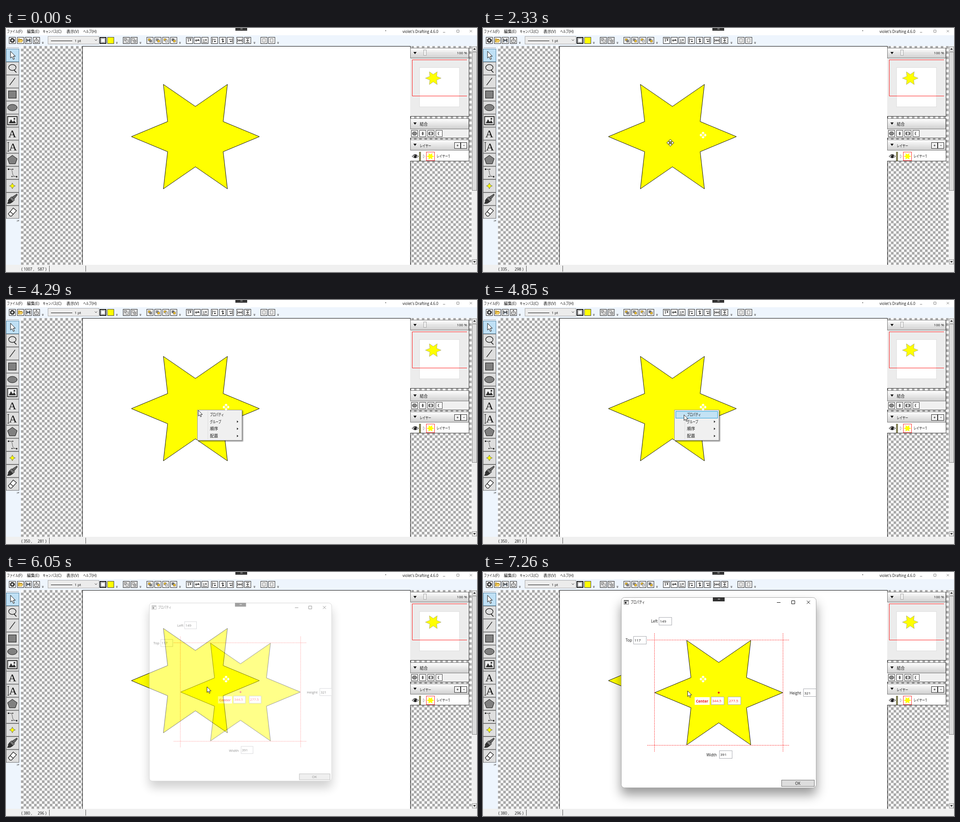
Animation, 1037 px wide and 540 px high, one loop 8 s. Source, as an HTML page:

```html
<!DOCTYPE html>
<html lang="ja">
<head>
<meta charset="utf-8">
<title>Star properties</title>
<style>
  html, body { margin: 0; width: 100%; height: 100%; overflow: hidden; background: #fff; }
  svg { display: block; width: 1037px; height: 540px; }
  text { font-family: 'Open Sans', 'Noto Sans CJK JP', 'Noto Sans CJK', sans-serif; fill: #111; white-space: pre; }
  .cjk { font-family: 'Noto Sans CJK JP', 'Noto Sans CJK', sans-serif; }
  .serif { font-family: 'Liberation Serif', serif; }
  .shade { filter: drop-shadow(0 15px 12px rgba(0,0,0,.4)); }
  .lift { filter: drop-shadow(2px 2px 1px rgba(0,0,0,.45)); }
</style>
</head>
<body>
<svg id="stage" viewBox="0 0 1037 540" xmlns="http://www.w3.org/2000/svg"></svg>
<script>
const stage = document.getElementById('stage');
const ZOOM = 0.721; // stage pixels per canvas unit
const KANA = 0.7;   // kana of the interface face are narrower than kanji

// ---------- drawing helpers ----------
const rect = (x, y, w, h, fill, stroke = 'none', more = '') =>
  `<rect x="${x}" y="${y}" width="${w}" height="${h}" fill="${fill}" stroke="${stroke}" ${more}/>`;
const path = (d, fill = 'none', stroke = '#111', more = '') =>
  `<path d="${d}" fill="${fill}" stroke="${stroke}" ${more}/>`;
const oval = (x, y, rx, ry, fill, stroke = 'none', more = '') =>
  `<ellipse cx="${x}" cy="${y}" rx="${rx}" ry="${ry}" fill="${fill}" stroke="${stroke}" ${more}/>`;
const group = (x, y, body, more = '') => `<g transform="translate(${x} ${y})" ${more}>${body}</g>`;
const latin = (x, y, s, size = 8.3, more = '') =>
  `<text x="${x}" y="${y}" font-size="${size}" ${more}>${s}</text>`;

function label(x, y, s, size = 8.8) {
  return s.match(/[ァ-ヿ]+|[一-鿿]+|[^ァ-ヿ一-鿿]+/g).map(run => {
    const kana = /[ァ-ヿ]/.test(run), kanji = /[一-鿿]/.test(run);
    if (!kana && !kanji) return latin(x, y, run, size * 0.95);
    const squeeze = kana ? KANA : 1;
    const out = `<text class="cjk" font-size="${size}" transform="translate(${x} ${y}) scale(${squeeze} 1)">${run}</text>`;
    x += run.length * size * squeeze;
    return out;
  }).join('');
}

function star(cx, cy, R, stroke = '#111', width = 1, tips = 6, inner = 0.5, squash = 0.947) {
  const pts = Array.from({ length: tips * 2 }, (_, i) => {
    const a = Math.PI * i / tips, r = i % 2 ? R * inner : R;
    return (cx + r * Math.cos(a)).toFixed(1) + ',' + (cy + r * squash * Math.sin(a)).toFixed(1);
  });
  return `<polygon points="${pts.join(' ')}" fill="#ff0" stroke="${stroke}" stroke-width="${width}"/>`;
}

const ARROW = 'M0 0V12.6L2.9 9.9 4.9 14.4 6.9 13.5 5 9.2H9Z';

// four diamonds around a centre, the move pointer
const cross = (stroke, core) =>
  [0, 90, 180, 270].map(a => path('M0-7.8 3.4-4.4 0-1.8-3.4-4.4Z', '#fff', stroke, `transform="rotate(${a})"`)).join('') +
  oval(0, 0, core, core, '#fff', stroke);

// ---------- window frame, menu bar and tool bar ----------
function topBars() {
  let s = rect(0, 0, 1037, 40, '#fff') + rect(0, 16, 1037, 24, '#eef5fd');
  [[2, 'ファイル(F)'], [46, '編集(E)'], [81, 'キャンバス(C)'], [133, '表示(V)'], [170, 'ヘルプ(H)']]
    .forEach(([x, t]) => s += label(x, 11, t));
  s += rect(505, 0, 26, 6, '#333') + rect(516, 1, 5, 2, '#888') + oval(836, 6, 1, 1, '#555');
  s += latin(952, 11, "violet's Drafting 4.6.0", 8.1, 'text-anchor="end"');
  s += path('M962 9.5H967M992.5 4.5H997.5V9.5H992.5ZM1021 4.5 1026 9.5M1026 4.5 1021 9.5', 'none', '#888');

  const box = (cx, icon) => rect(cx - 7, 20.5, 14, 14, '#fff', '#222') + group(cx, 27.5, icon);
  const more = x => path(`M${x - 2} 31.5H${x + 2}`, 'none', '#666') + path(`M${x - 2} 33H${x + 2}L${x} 35Z`, '#444', 'none');

  s += box(14, oval(0, 0, 3.4, 3.4, 'none', '#111', 'stroke-width="2"') +
    oval(0, 0, 4.8, 4.8, 'none', '#111', 'stroke-width="1.6" stroke-dasharray="1.9 1.87"'));
  s += box(32, path('M-5 4V-4H-2L-1-3H3V-1', '#e8b93c', '#8a6a10', 'stroke-width=".7"') +
    path('M-5 4-2.5-1H5.5L3 4Z', '#ffd766', '#8a6a10', 'stroke-width=".7"'));
  s += box(49, path('M-4.5-4.5H3.5L4.5-3.5V4.5H-4.5Z', '#33383e', 'none') + rect(-2.5, -4.5, 5, 3, '#fff') + rect(-2.8, 0.5, 5.6, 4, '#cdd6df'));
  s += box(67, path('M-2-1H-4V4.5H4V-1H2M0 2V-5M-2.2-3 0-5.2 2.2-3'));
  s += more(81);

  s += rect(92.5, 18.5, 112, 17, '#ececec', '#aaa') + path('M99 28.5H146') + latin(151, 31, '1 pt', 8);
  s += path('M195.5 25.5 198 28 200.5 25.5', 'none', '#444');
  s += rect(207, 21, 13, 13, '#fff', '#111', 'stroke-width="2"') + rect(209.5, 23.5, 8, 8, '#fff', '#888');
  s += rect(223.5, 20.5, 14, 14, '#ff0', '#444') + more(244);

  const pair = (a, b) => rect(-4, -4, 5, 5, a, '#555', 'stroke-width=".7"') + rect(-1, -1, 5, 5, b, '#555', 'stroke-width=".7"');
  const frame = rect(-5, -5, 10, 10, 'none', '#777', 'stroke-dasharray="1.5 1.5"');
  s += box(265, frame + pair('#ccc', '#eee')) + box(282, frame + pair('#eee', '#bbb')) + more(296);
  const gold = '#f2c230';
  [[gold, '#888'], ['#999', gold], [gold, '#ddd'], ['#777', gold]].forEach((c, i) => s += box(317 + 17.4 * i, pair(...c)));
  s += more(383);

  const bars = vertical => `<g ${vertical ? 'transform="rotate(90)"' : ''}>` + rect(-3.5, -3, 2.4, 6, '#888') + rect(1, -3, 2.4, 4, '#444');
  [[404, 0, -4.5], [421, 0, 0], [438, 0, 4.5], [459, 1, 4.5], [477, 1, 0], [494, 1, -4.5]]
    .forEach(([x, v, line]) => s += box(x, bars(v) + path(`M-5 ${line}H5`) + '</g>'));
  s += box(515, path('M-4.5-4V4M4.5-4V4M0-3V3M-4 0H4')) + box(532, path('M-4-4.5H4M-4 4.5H4M-3 0H3M0-4V4')) + more(547);
  const fit = rect(-3, -4, 6, 8, '#eee', '#777');
  return s + box(568, fit) + box(585, fit) + more(599);
}

// ---------- tool box on the left ----------
function toolBox() {
  let s = rect(0, 40, 33, 484, '#eef5fd') + path('M2 43.5H28', 'none', '#666', 'stroke-dasharray="1.5 1.5"');
  const big = (x, t) => `<text class="serif" x="${x}" y="8" font-size="24" text-anchor="middle">${t}</text>`;
  const icons = [
    path('M-4-9V6L-.6 3 2 9 4.5 8 2 2H6.5Z', '#fff'),
    oval(0, -2, 8, 6.5, 'none', '#111', 'stroke-width="1.2"') + path('M4 3Q5 6 9 9', 'none', '#111', 'stroke-width="1.5"'),
    path('M-6 8 6-8', 'none', '#111', 'stroke-width="1.2"'),
    rect(-8.5, -8, 17, 16, '#808080', '#111'),
    oval(0, 0, 10.5, 7, '#808080', '#111'),
    rect(-10.5, -9, 21, 18, '#eee', '#333', 'stroke-width="2"') + path('M-8 6-3-3 1 3 4-1 8 6Z', '#333', 'none') + oval(4.5, -4, 2, 2, '#333'),
    big(0, 'A'),
    big(1.5, 'A') + path('M-9-9V10M-11-9.5H-7M-11 10H-7'),
    path('M0-10 10.5-2.5 6.5 9H-6.5L-10.5-2.5Z', '#808080'),
    path('M-8-8C6-10-6 9 9 8M-8-8H1M9 8H-1', 'none', '#555') + rect(-10, -9.5, 3, 3, '#222') + rect(8, 7, 3, 3, '#222') + oval(1, -8, 1.2, 1.2, '#222') + oval(-1, 8, 1.2, 1.2, '#222'),
    star(0, 0, 6.5, '#555', 0.8, 4, 0.45, 1),
    path('M10-11 11-9 4 0-1-4Z', '#666', '#222') + path('M-2-5 5 2 1 6-6-1Z', '#777', '#222') + path('M-6-1 1 6Q-4 11-11 10-8 6-9 3Z', '#333', '#222'),
    path('M-9 4 2-9 9-3-2 9H-5ZM-5-1 2 5', '#fff', '#111', 'stroke-width="1.2"')
  ];
  icons.forEach((icon, i) => {
    const y = 60.5 + 28.9 * i;
    s += rect(0.5, y - 14, 28, 28, i ? '#dedede' : '#bfe0f5', i ? '#707070' : '#5a8aa8') + group(14, y, icon);
  });
  return s + path('M24 425 25.5 427 24 429M26.5 425.5H28.5L27.5 428Z', 'none', '#555', 'stroke-width=".8"');
}

// ---------- panels on the right ----------
function panels() {
  const head = (y, h) => rect(890.5, y, 128.5, h, 'url(#head)', '#777') + path(`M897 ${y + 8.5}H904L900.5 ${y + 13.5}Z`, '#111', 'none');
  let s = rect(890, 44, 129, 152, '#ececec') + head(44.5, 22);
  s += path('M908 55H985', 'none', '#ddd') + rect(919.5, 48.5, 6, 12, '#f0f0f0', '#aaa') + latin(1015, 58, '100 %', 8, 'text-anchor="end"');
  s += rect(910.5, 87.5, 88, 87, '#fff', '#ddd') + star(940.7, 111, 17.3, '#777', 0.5);
  s += path('M1015 70.5H894.5V150.5H1015', 'none', '#f22');
  s += path('M890 195.5H1019.5V44', 'none', '#333');

  s += rect(890, 200, 129, 44, '#f0f0f0') + head(200.5, 23) + label(911, 216, '結合');
  const cells = [oval(0, 0, 5, 4, '#888', '#444'), oval(0, 0, 2, 4, '#666'),
    path('M-1-4A4 4 0 0 0-1 4Q-3 0-1-4ZM1-4A4 4 0 0 1 1 4Q3 0 1-4Z', '#777', '#444', 'stroke-width=".7"'),
    path('M1-4A4 4 0 1 0 1 4Q-3 0 1-4Z', '#666', 'none')];
  cells.forEach((c, i) => s += rect(892.5 + 18 * i, 226.5, 14, 14, '#fff', '#444') + group(899.5 + 18 * i, 233.5, c));
  s += path('M890 243.5H1019.5V200', 'none', '#333');

  s += rect(890, 247, 129, 48, '#fff') + head(247.5, 23) + label(911, 264, 'レイヤー', 9);
  s += rect(987.5, 253.5, 13, 13, '#f4f4f4', '#333') + rect(1001.5, 253.5, 13, 13, '#f4f4f4', '#333');
  s += path('M992 260H996.5M994.2 257.8V262.2M1006.5 260H1010', 'none', '#222', 'stroke-width=".9"');
  s += path('M894 284Q901 276 908 284 901 291 894 284Z', '#fff') + oval(901, 283.5, 3.4, 3.4, '#111') + oval(900, 282.5, 1, 1, '#fff');
  s += rect(909.5, 274, 4, 20, '#7d7a4d') + path('M918.5 280V288L922.5 284Z', '#fff', '#999', 'stroke-width=".8"');
  s += rect(925.5, 274.5, 18, 19, '#fff', '#f33') + star(934.5, 284, 8.6, 'none') + label(948, 287, 'レイヤー1', 9);
  return s + path('M890 294.5H1019.5V247', 'none', '#333');
}

function workArea() {
  let s = rect(33, 40, 993, 484, 'url(#check)') + rect(168.5, 40.5, 722, 490, '#fff', '#111') + star(417, 240.4, 141);
  s += panels();
  s += rect(1025, 40, 12, 484, '#f0f0f0') + rect(1026.5, 53.5, 10, 306, '#dcdcdc', '#888');
  s += rect(1026.5, 41.5, 10, 10, '#e8e8e8', '#999') + rect(1026.5, 512.5, 10, 10, '#e8e8e8', '#999');
  s += path('M1028.5 48H1034.5L1031.5 44.5ZM1028.5 516H1034.5L1031.5 519.5Z', '#222', 'none');
  s += rect(0, 524, 1037, 16, '#f0f0f0') + path('M95.5 526V539M175.5 526V539', 'none', '#555');
  return s + latin(34, 536.5, '', 8.4, 'id="left"') + latin(84, 536.5, '', 8.4, 'id="top" text-anchor="end"') + latin(86.5, 536.5, ')', 8.4);
}

// ---------- property window and context menu ----------
function dialog() {
  const field = (x, y, v, c = '#111') => rect(x + .5, y + .5, 28, 17, '#fff', '#abadb3') + latin(x + 2.5, y + 12, v, 8, `style="fill:${c}"`);
  const name = (x, y, t) => latin(x, y, t, 8.3);
  let s = rect(304.5, 56.5, 429, 421, '#fff', '#aaa', 'rx="7" class="shade"');
  s += rect(506, 56, 26, 9, '#333') + rect(517, 59, 5, 2, '#999');
  s += rect(310.5, 62.5, 10, 9, '#fff', '#777') + rect(311, 63, 10, 2, '#777') + rect(312, 66, 4, 4, '#333') + label(325, 70, 'プロパティ', 9.1);
  s += path('M647 67.5H655M679.5 63.5H686.5V70.5H679.5ZM713 63.5 720 70.5M720 63.5 713 70.5');
  s += star(519, 267, 141);
  s += path('M377.5 136V398M660.5 136V398M362 150.5H674M362 383.5H674', 'none', '#f22', 'stroke-dasharray="2 1.6"');
  s += name(370, 112, 'Left') + field(387, 100, '149') + name(314, 154, 'Top') + field(331, 142, '117');
  s += name(675, 270.5, 'Height') + rect(705, 259, 28, 17, '#fff') + path('M733 258.5H705.5V275.5H733', 'none', '#abadb3') + latin(707.5, 270.5, '321', 8);
  s += name(492, 408, 'Width') + field(520, 395, '391');
  s += oval(519, 267, 1.8, 1.8, '#f22', '#b00', 'stroke-width=".5"');
  s += rect(466, 277, 33, 17, '#fff') + latin(469, 288.5, 'Center', 8, 'font-weight="700" style="fill:#f01818"');
  s += field(502, 276, '344.5', '#f22') + field(539, 276, '277.5', '#f22');
  return s + rect(657.5, 460.5, 72, 14, '#ddd', '#707070') + latin(693, 470.5, 'OK', 8.2, 'text-anchor="middle"');
}

function contextMenu() {
  let s = rect(421.5, 243.5, 98, 67, '#f0f0f0', '#999', 'class="lift"') + path('M444.5 246V308', 'none', '#dcdcdc');
  s += `<g id="hot">${rect(424.5, 246.5, 92, 15, '#c3e2f4', '#26a0da')}</g>`;
  ['プロパティ', 'グループ', '順序', '配置'].forEach((t, i) => {
    const y = 253.5 + 15.8 * i;
    s += label(449, y + 3.3, t, 9);
    if (i) s += path(`M508.5 ${y - 2.5}V${y + 2.5}L511.5 ${y}Z`, '#111', 'none');
  });
  return s;
}

const CELL = 8 * ZOOM, DARK = '#a9a9a9';
stage.innerHTML = `<defs>
  <pattern id="check" x="33" y="40" width="${CELL * 2}" height="${CELL * 2}" patternUnits="userSpaceOnUse">
    ${rect(0, 0, CELL * 2, CELL * 2, '#fff') + rect(CELL, 0, CELL, CELL, DARK) + rect(0, CELL, CELL, CELL, DARK)}
  </pattern>
  <linearGradient id="head" x2="0" y2="1"><stop stop-color="#fff"/><stop offset="1" stop-color="#cfcfcf"/></linearGradient>
</defs>` + workArea() + topBars() + toolBox() +
  `<g id="dialog">${dialog()}</g><g id="menu">${contextMenu()}</g>
  <g id="trace">${group(484.5, 237, cross('none', 1))}</g>
  <g id="arrow">${path(ARROW, '#fff', '#111', 'stroke-width=".9"')}</g>
  <g id="cross">${cross('#111', 1.5)}</g>`;

// ---------- motion ----------
const LOOP = 8000, TICK = 70;
const MENU = 3340, OPEN = 5910;
// start time, ticks, way points of the pointer
const moves = [
  [520, 8, [[894.5, 463.6], [730, 440], [650, 439], [600, 444], [576, 452]]],
  [1280, 12, [[576, 452], [545, 330], [484.5, 237], [385, 270]]],
  [2120, 8, [[385, 270], [412.5, 254], [421, 243]]],
  [4290, 9, [[421, 243], [442.5, 254]]],
  [6650, 4, [[442.5, 254], [448, 260], [447, 266], [442.5, 267]]],
  [7190, 2, [[442.5, 267], [450.5, 263]]]
];
const ticks = (t, start) => Math.floor((t - start) / TICK) + 1;

function pointer(t, lag = 0) {
  const move = moves.findLast(m => m[0] <= t);
  if (!move) return moves[0][2][0];
  const [start, n, pts] = move;
  const f = (Math.min(n, ticks(t, start)) - lag) / n * (pts.length - 1);
  const i = Math.min(pts.length - 2, Math.floor(f));
  return pts[i].map((v, j) => v + (pts[i + 1][j] - v) * (f - i));
}

const part = Object.fromEntries(['dialog', 'menu', 'hot', 'trace', 'arrow', 'cross', 'left', 'top']
  .map(id => [id, document.getElementById(id)]));
const show = (el, on) => el.setAttribute('visibility', on ? 'inherit' : 'hidden');

function draw(t) {
  const [x, y] = pointer(t);
  const dragging = t >= 1770 && t < MENU;
  for (const el of [part.arrow, part.cross]) el.setAttribute('transform', `translate(${x} ${y})`);
  show(part.arrow, t >= 520 && !dragging);
  show(part.cross, dragging);
  show(part.trace, t >= 1840);

  // the read-out trails the pointer and rests while a menu or dialog is up
  const [sx, sy] = t < MENU ? pointer(t, 0.37) : pointer(t < OPEN ? MENU : OPEN);
  part.left.textContent = `( ${Math.floor((sx - 168) / ZOOM)} ,`;
  part.top.textContent = Math.floor((sy - 40) / ZOOM);

  const m = Math.min(1, Math.max(0, (ticks(t, MENU) - 1) / 5));
  part.menu.setAttribute('opacity', m ** 1.5);
  show(part.menu, t >= MENU && t < OPEN + 2 * TICK);
  show(part.hot, y > 246 && t > 4290 && t < OPEN);

  const p = Math.min(1, Math.max(0, (ticks(t, OPEN) - 1) / 5));
  const e = ((1 - p) / 0.8) ** 2.2;
  part.dialog.setAttribute('opacity', Math.min(1, p * 1.15));
  part.dialog.setAttribute('transform',
    `translate(${518.5 - 5 * e} ${267 - 2.5 * e}) scale(${1 - 0.121 * e}) translate(-518.5 -267)`);
  show(part.dialog, p > 0);
}

const begin = performance.now();
function frame() {
  draw((performance.now() - begin) % LOOP);
  requestAnimationFrame(frame);
}
frame();
</script>
</body>
</html>
```
